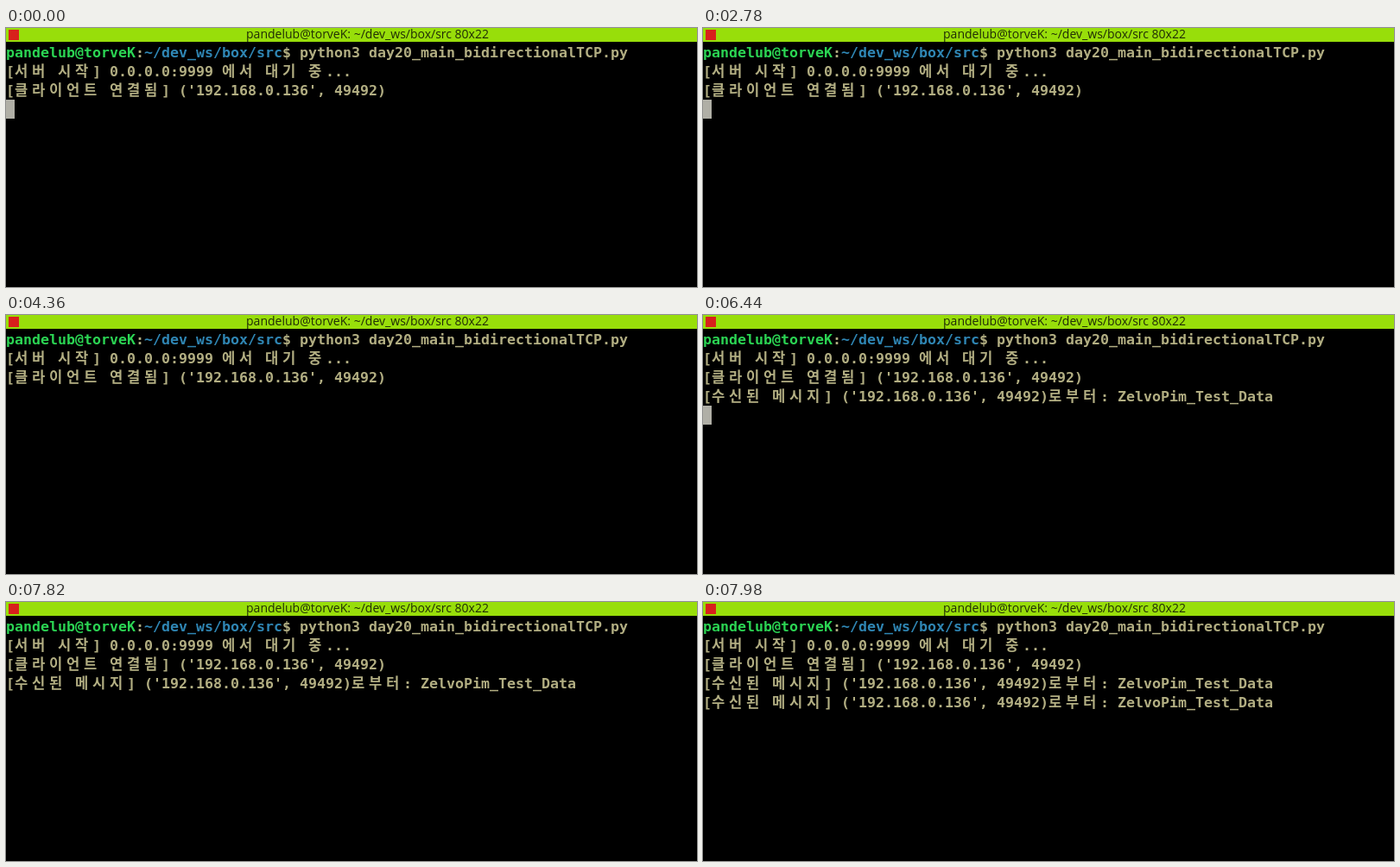
Write an HTML page with a canvas that moves like this. It is 800x300 px and loops after 8000 ms.

```html
<!DOCTYPE html>
<html lang="ko">
<head>
<meta charset="utf-8">
<style>
  html, body { margin: 0; height: 100%; overflow: hidden; background: #000; }
  canvas { display: block; }
</style>
</head>
<body>
<canvas id="stage" width="800" height="300"></canvas>
<script>
const ctx = document.getElementById('stage').getContext('2d');
const LOOP = 8000, CELL = 10, ROW = 22, TOP = 17;
const TEXT = '#b2ae82', USER = '#2bd453', PATH = '#2f86b4';
const user = 'pandelub@torveK', path = '~/dev_ws/box/src';
const message = "[수신된 메시지] ('192.168.0.136', 49492)로부터: ZelvoPim_Test_Data";

// Hangul takes two cells; returns the next free column
function print(text, row, col = 0, color = TEXT) {
  ctx.fillStyle = color;
  for (const ch of text) {
    ctx.fillText(ch, col * CELL, TOP + row * ROW + 17);
    col += ch >= '가' && ch <= '힣' ? 2 : 1;
  }
  return col;
}

function titleBar() {
  ctx.fillStyle = '#98de0a';
  ctx.fillRect(0, 0, 800, 16);
  ctx.fillStyle = '#d8201c';
  ctx.fillRect(3, 2, 12, 12);
  ctx.fillStyle = '#202c06';
  ctx.font = '14px "Open Sans", sans-serif';
  ctx.textAlign = 'center';
  ctx.fillText(`${user}: ${path} 80x22`, 418.5, 12);
}

function draw(t) {
  ctx.fillStyle = '#000';
  ctx.fillRect(0, 0, 800, 300);
  titleBar();

  ctx.textAlign = 'left';
  ctx.font = 'bold 16.6px "DejaVu Sans Mono", "Noto Sans CJK KR", "Noto Sans CJK", monospace';
  let col = print(user, 0, 0, USER);
  col = print(':', 0, col);
  col = print(path, 0, col, PATH);
  print('$ python3 day20_main_bidirectionalTCP.py', 0, col);
  print('[서버 시작] 0.0.0.0:9999 에서 대기 중...', 1);
  print("[클라이언트 연결됨] ('192.168.0.136', 49492)", 2);

  const received = (t >= 6440) + (t >= 7860);
  for (let i = 0; i < received; i++) print(message, 3 + i);

  const flips = [1000, 2780, 4360, 6140, 7820].filter(at => t >= at).length;
  if (flips % 2 === 0) {
    ctx.fillStyle = '#b0afa6';
    ctx.fillRect(0, TOP + (3 + received) * ROW, CELL, ROW);
  }
}

const start = performance.now();
function tick() {
  draw((performance.now() - start) % LOOP);
  requestAnimationFrame(tick);
}
tick();
</script>
</body>
</html>
```
